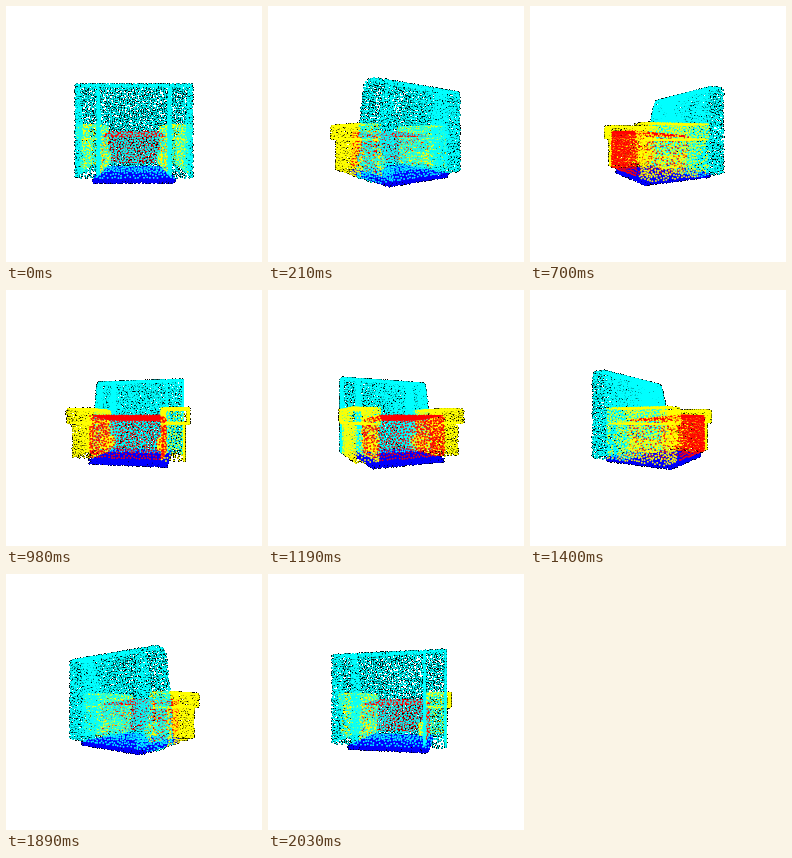
These frames come from a looping animation (256 px wide and 256 px high, 2100 ms). An HTML page with a canvas:

```html
<!DOCTYPE html>
<html lang="en">
<head>
<meta charset="utf-8">
<title>Armchair point cloud</title>
<style>
  html, body { margin: 0; width: 100%; height: 100%; overflow: hidden; background: #fff; }
  canvas { display: block; width: 100vw; height: 100vh; image-rendering: pixelated; }
</style>
</head>
<body>
<canvas id="stage" width="256" height="256"></canvas>
<script>
const SIZE = 256, STEPS = 30, STEP_MS = 70;
const COUNT = 10000, MAX_TRIES = 120000, RADIUS = 1.28;
const DISTANCE = 3, FOCAL = SIZE / 2 / Math.tan(Math.PI / 6);
const CYAN = [0, 255, 255], YELLOW = [255, 255, 0], RED = [255, 0, 0], BLUE = [0, 0, 255];

let seed = 7;
function random() {
  seed = (seed + 0x6D2B79F5) | 0;
  let t = Math.imul(seed ^ (seed >>> 15), 1 | seed);
  t = (t + Math.imul(t ^ (t >>> 7), 61 | t)) ^ t;
  return ((t ^ (t >>> 14)) >>> 0) / 4294967296;
}

// Model space: x across, y up, z towards the rear of the chair.
const faces = [];
const minus = (a, b) => a.map((v, i) => v - b[i]);
const cross = (a, b) => [
  a[1] * b[2] - a[2] * b[1], a[2] * b[0] - a[0] * b[2], a[0] * b[1] - a[1] * b[0]
];

function quad(color, a, b, c, d) {
  const area = Math.hypot(...cross(minus(c, a), minus(d, b))) / 2;
  faces.push({ color, corners: [a, b, c, d], area });
}

// A block open at the rear, with its ends given as [z, bottom, top].
function block(color, x0, x1, front, rear, hasBottom) {
  const [zf, bf, tf] = front, [zr, br, tr] = rear;
  const level = (yf, yr) => quad(color, [x0, yf, zf], [x1, yf, zf], [x1, yr, zr], [x0, yr, zr]);
  for (const x of [x0, x1]) quad(color, [x, bf, zf], [x, tf, zf], [x, tr, zr], [x, br, zr]);
  quad(color, [x0, bf, zf], [x1, bf, zf], [x1, tf, zf], [x0, tf, zf]);
  level(tf, tr);
  if (hasBottom) level(bf, br);
}

function backrest() {
  const half = 0.65, seam = 0.417;
  // Levels: [y, front z, rear z]
  const levels = [[-0.488, 0.13, 0.55], [0.11, 0.21, 0.55], [0.53, 0.31, 0.55], [0.56, 0.35, 0.52]];
  const across = (y0, z0, y1, z1) =>
    quad(CYAN, [-half, y0, z0], [half, y0, z0], [half, y1, z1], [-half, y1, z1]);
  for (let i = 1; i < levels.length; i++) {
    const [y0, f0, r0] = levels[i - 1], [y1, f1, r1] = levels[i];
    across(y0, f0, y1, f1);
    across(y0, r0, y1, r1);
    for (const x of [-half, -seam, seam, half]) {
      quad(CYAN, [x, y0, f0], [x, y0, r0], [x, y1, r1], [x, y1, f1]);
    }
  }
  const [y, f, r] = levels[3];
  across(y, f, y, r);
}

backrest();
for (const side of [-1, 1]) {
  block(YELLOW, side * 0.41, side * 0.71, [-0.52, -0.064, 0.11], [0.26, -0.064, 0.11], true);
  block(YELLOW, side * 0.41, side * 0.66, [-0.47, -0.475, -0.064], [0.3, -0.475, -0.064], false);
  block(YELLOW, side * 0.34, side * 0.41, [-0.2, -0.4, -0.27], [0.25, -0.4, -0.27], true);
}
block(RED, -0.42, 0.42, [-0.51, -0.458, 0.03], [0.2, -0.458, -0.03], false);
block(BLUE, -0.463, 0.463, [-0.43, -0.552, -0.505], [0.51, -0.552, -0.505], true);
quad(BLUE, [-0.463, -0.552, 0.51], [0.463, -0.552, 0.51], [0.463, -0.505, 0.51], [-0.463, -0.505, 0.51]);

// Scatter points over the faces, keeping a minimum gap between neighbours.
function scatter() {
  const total = faces.reduce((sum, f) => sum + f.area, 0);
  const gap = Math.sqrt(0.56 * total / COUNT);
  const cells = new Map(), points = [];
  const cellOf = pos => pos.map(v => Math.floor(v / gap) + 100);
  const key = (x, y, z) => (x * 256 + y) * 256 + z;

  function pickFace() {
    let r = random() * total;
    return faces.find(f => (r -= f.area) <= 0) || faces[0];
  }

  function isCrowded([x, y, z], pos) {
    for (let i = x - 1; i <= x + 1; i++)
      for (let j = y - 1; j <= y + 1; j++)
        for (let k = z - 1; k <= z + 1; k++)
          for (const q of cells.get(key(i, j, k)) || [])
            if (Math.hypot(q[0] - pos[0], q[1] - pos[1], q[2] - pos[2]) < gap) return true;
    return false;
  }

  for (let tries = 0; points.length < COUNT && tries < MAX_TRIES; tries++) {
    const { color, corners: [a, b, c, d] } = pickFace();
    const u = random(), v = random();
    const pos = a.map((_, k) =>
      (a[k] * (1 - u) + b[k] * u) * (1 - v) + (d[k] * (1 - u) + c[k] * u) * v);
    const cell = cellOf(pos);
    if (isCrowded(cell, pos)) continue;
    const id = key(...cell);
    if (!cells.has(id)) cells.set(id, []);
    cells.get(id).push(pos);
    points.push({ pos, color, sx: 0, sy: 0, depth: 0 });
  }
  return points;
}

const points = scatter();
const ctx = document.getElementById('stage').getContext('2d');
const image = ctx.createImageData(SIZE, SIZE);
const sum = new Float32Array(SIZE * SIZE * 3);
const clear = new Float32Array(SIZE * SIZE);

function project(angle) {
  const cos = Math.cos(angle), sin = Math.sin(angle);
  for (const p of points) {
    const [x, y, z] = p.pos;
    p.depth = DISTANCE + x * sin - z * cos;
    const scale = FOCAL / p.depth;
    p.sx = SIZE / 2 + (x * cos + z * sin) * scale;
    p.sy = SIZE / 2 - y * scale;
  }
  points.sort((a, b) => a.depth - b.depth);
}

// Soft discs, nearest first, each fading to nothing at its rim.
function splat({ sx, sy, color }) {
  for (let y = Math.floor(sy - RADIUS); y <= sy + RADIUS; y++) {
    for (let x = Math.floor(sx - RADIUS); x <= sx + RADIUS; x++) {
      const weight = 1 - ((x + 0.5 - sx) ** 2 + (y + 0.5 - sy) ** 2) / RADIUS ** 2;
      if (weight <= 0) continue;
      const i = y * SIZE + x, part = clear[i] * weight;
      for (let k = 0; k < 3; k++) sum[i * 3 + k] += part * color[k];
      clear[i] -= part;
    }
  }
}

function draw(step) {
  sum.fill(0);
  clear.fill(1);
  project(step / STEPS * Math.PI * 2);
  points.forEach(splat);
  for (let i = 0; i < clear.length; i++) {
    const cover = 1 - clear[i];
    const gain = cover > 0 ? Math.min(1, Math.max(0, 1.4 * cover - 0.2)) / cover : 0;
    for (let k = 0; k < 3; k++) image.data[i * 4 + k] = cover > 0 ? sum[i * 3 + k] * gain : 255;
    image.data[i * 4 + 3] = 255;
  }
  ctx.putImageData(image, 0, 0);
}

let shown = -1;
function tick() {
  const step = Math.floor(performance.now() / STEP_MS) % STEPS;
  if (step !== shown) draw(shown = step);
  requestAnimationFrame(tick);
}
tick();
</script>
</body>
</html>
```
